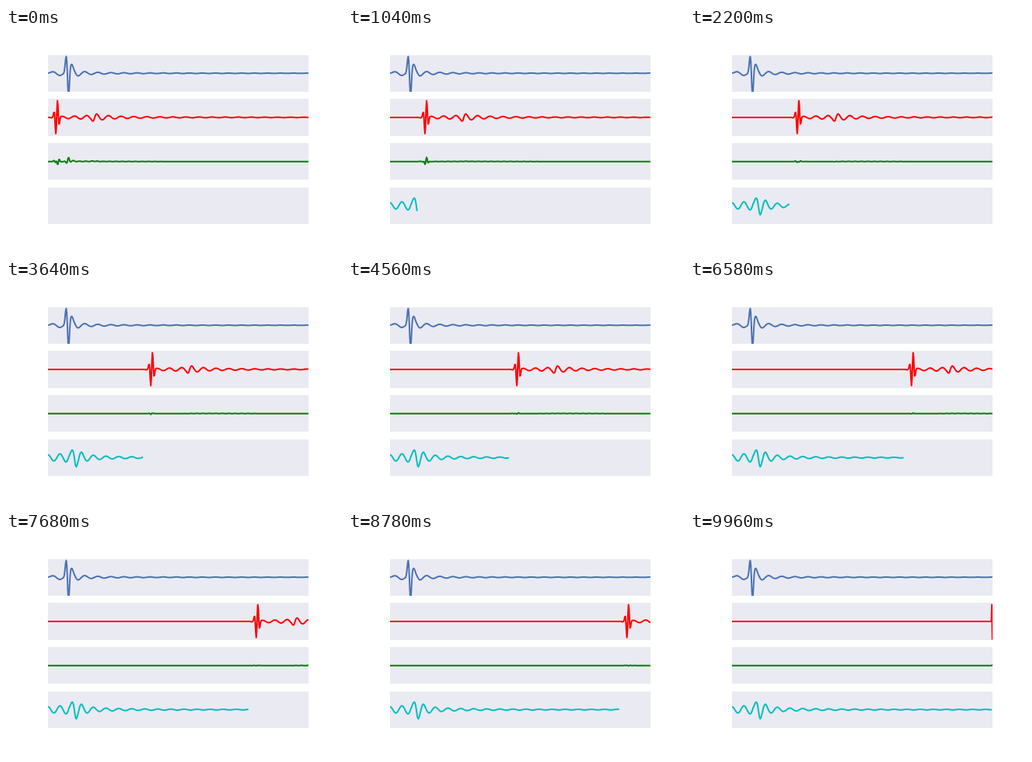
An HTML page for the animation above (9980 ms loop, 432 px wide and 288 px high).

```html
<!DOCTYPE html>
<html lang="en">
<head>
<meta charset="utf-8">
<title>Sliding product of two signals</title>
<style>
html, body { margin: 0; width: 100%; height: 100%; overflow: hidden; background: #fff; }
svg { display: block; width: 100vw; height: 100vh; }
path { fill: none; stroke-width: 2; stroke-linejoin: round; stroke-linecap: butt; }
</style>
</head>
<body>
<svg id="stage" viewBox="0 0 432 288"></svg>
<script>
const N = 500, FRAMES = 499, STEP = 20;
const LEFT = 54, DX = 334.8 / (N - 1);
const FULL = 21.49;   // height of a signal's normalised maximum
const GAIN = 0.116;   // display scale of the product
const TAU = 2 * Math.PI;
const stage = document.getElementById('stage');

// A single smooth pulse.
const bump = (x, at, width, height) =>
  height * Math.exp(-0.5 * ((x - at) / width) ** 2);

// A growing oscillation, present only between two places.
const swell = (x, from, to, period, peak, height, growth) =>
  x < from || x > to ? 0
    : height * Math.exp((x - from) / growth) * Math.cos(TAU * (x - peak) / period);

// A fading oscillation that sets in a quarter turn before its first peak.
function ring(x, peak, height, fade, warp) {
  const d = x - peak;
  const turn = d / 16.8 + warp * (1 - Math.exp(-d / 20));
  return turn < -0.25 ? 0
    : height / (1 + Math.max(d, 0) / fade) * Math.cos(TAU * turn);
}

const blueAt = x =>
  bump(x, 60.5, 3, 2) + bump(x, 69, 3, -2.8) + bump(x, 77.5, 1.3, 22.5) +
  bump(x, 80.4, 1.1, -34) + bump(x, 84.3, 2.3, 11.5) + ring(x, 93, -3.4, 14, 0);

const redAt = x =>
  swell(x, LEFT, 59, 2 * DX, LEFT, 0.05, 8) +
  bump(x, 58.2, 0.9, -0.6) + bump(x, 62, 0.9, 8) + bump(x, 64.15, 0.85, -24) +
  bump(x, 66.15, 0.85, 25) + bump(x, 68.2, 0.8, -11) +
  swell(x, 68.25, 107.75, 15.8, 72.2, 1.3, 55) +
  bump(x, 111.8, 2, -5) + ring(x, 116.4, 5, 15, 0.15);

const cyanAt = x =>
  swell(x, LEFT, 81, 15.6, 53.7, 3.8, 60) +
  bump(x, 85.6, 2.6, 10.5) + bump(x, 90, 1.9, -14) + ring(x, 97, 7, 12, 0.15);

const sample = f => Array.from({ length: N }, (_, i) => f(LEFT + i * DX));
const blue = sample(blueAt);
const red = sample(redAt);
const cyan = sample(cyanAt);

function add(parent, tag, attrs) {
  const el = document.createElementNS('http://www.w3.org/2000/svg', tag);
  for (const k in attrs) el.setAttribute(k, attrs[k]);
  return parent.appendChild(el);
}

function panel(row, top, bottom, color) {
  const box = { x: LEFT, y: top, width: 335, height: bottom - top };
  add(stage, 'rect', { ...box, fill: '#eaeaf2' });
  add(add(stage, 'clipPath', { id: 'clip' + row }), 'rect', box);
  const group = add(stage, 'g', { 'clip-path': `url(#clip${row})` });
  const path = add(group, 'path', { stroke: color });
  const mid = 58.2 + row * 56.72;
  return data => path.setAttribute('d', data.length < 2 ? '' : 'M' + data.map(
    (v, i) => (LEFT + i * DX).toFixed(2) + ' ' +
      (mid - Math.max(-60, Math.min(60, v))).toFixed(2)
  ).join('L'));
}

const drawBlue = panel(0, 35, 82, '#4c72b0');
const drawRed = panel(1, 91, 139, '#ff0000');
const drawGreen = panel(2, 148, 195, '#008000');
const drawCyan = panel(3, 205, 252, '#00bfbf');
drawBlue(blue);

function render(frame) {
  // The sliding signal is rescaled to the maximum still in view.
  const scale = FULL / Math.max(...red.slice(0, N - frame));
  const moved = blue.map((_, i) => i < frame ? 0 : red[i - frame] * scale);
  drawRed(moved);
  drawGreen(moved.map((v, i) => v * blue[i] * GAIN));
  drawCyan(cyan.slice(0, frame + 1));
}

const start = performance.now();
let shown = -1;
function tick() {
  const frame = Math.floor((performance.now() - start) / STEP) % FRAMES;
  if (frame !== shown) render(shown = frame);
  requestAnimationFrame(tick);
}
tick();
</script>
</body>
</html>
```
